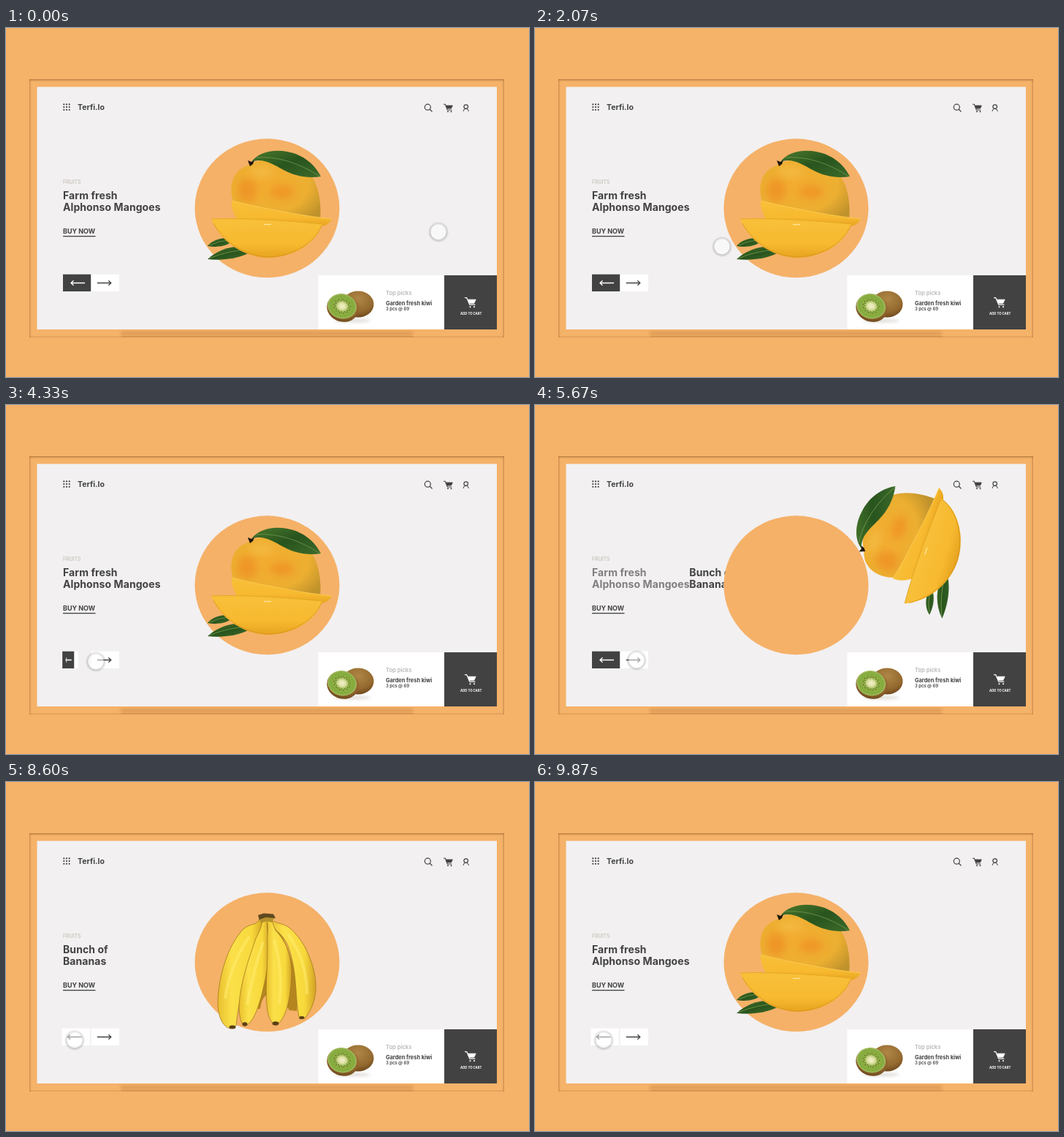
These frames come from a looping animation (716x477 px, 9940 ms). An HTML page:

```html
<!DOCTYPE html>
<html lang="en">
<head>
<meta charset="utf-8">
<title>Fruit shop slider</title>
<style>
  html, body { margin: 0; width: 100%; height: 100%; overflow: hidden; background: #f5b269; }
  svg { position: absolute; left: 0; top: 0; width: 716px; height: 477px; }
  .well { position: absolute; left: 32px; top: 70px; width: 650px; height: 353px;
    box-shadow: inset 0 1px 3px rgba(95, 50, 0, .45), inset 0 0 3px rgba(95, 50, 0, .28); }
  text { font-family: Inter, "Open Sans", sans-serif; font-weight: 700; fill: #424242; }
  .title { font-size: 14px; letter-spacing: .08px; }
  .line { fill: none; stroke: #424242; stroke-width: 1.2; stroke-linecap: round; stroke-linejoin: round; }
</style>
</head>
<body>
<div class="well"></div>
<svg viewBox="0 0 716 477">
  <defs>
    <clipPath id="page"><rect x="42.5" y="80.5" width="629.5" height="331.5"/></clipPath>
    <filter id="soft" x="-20%" y="-200%" width="140%" height="500%"><feGaussianBlur stdDeviation="2"/></filter>
    <filter id="blur" x="-50%" y="-50%" width="200%" height="200%"><feGaussianBlur stdDeviation="6"/></filter>
    <radialGradient id="skin" cx=".4" cy=".4" r=".72">
      <stop offset="0" stop-color="#f3ad31"/><stop offset=".65" stop-color="#ecaf31"/><stop offset="1" stop-color="#c0922b"/>
    </radialGradient>
    <linearGradient id="flesh" x1="0" y1="0" x2="0" y2="1">
      <stop offset="0" stop-color="#f8c03a"/><stop offset=".65" stop-color="#f7b92f"/><stop offset="1" stop-color="#e7a31f"/>
    </linearGradient>
    <linearGradient id="leaf" x1="0" y1="0" x2="1" y2="1">
      <stop offset="0" stop-color="#4b7a2c"/><stop offset=".5" stop-color="#28541e"/><stop offset="1" stop-color="#3d6b2a"/>
    </linearGradient>
    <linearGradient id="peel">
      <stop offset="0" stop-color="#e9bf2e"/><stop offset=".3" stop-color="#fbe04a"/>
      <stop offset=".75" stop-color="#f8d93c"/><stop offset="1" stop-color="#d3a324"/>
    </linearGradient>
    <radialGradient id="fur" cx=".5" cy=".3" r=".7">
      <stop offset="0" stop-color="#b08645"/><stop offset=".7" stop-color="#94692f"/><stop offset="1" stop-color="#70491d"/>
    </radialGradient>
    <radialGradient id="pulp">
      <stop offset="0" stop-color="#f3efcd"/><stop offset=".25" stop-color="#dfe2a4"/><stop offset=".48" stop-color="#8fae43"/>
      <stop offset=".85" stop-color="#84ab3d"/><stop offset="1" stop-color="#a9bd66"/>
    </radialGradient>
    <radialGradient id="halo">
      <stop offset=".68" stop-opacity="0"/><stop offset=".75" stop-opacity=".17"/><stop offset="1" stop-opacity="0"/>
    </radialGradient>
  </defs>

  <rect x="157" y="415" width="400" height="5" fill="#8a4c08" opacity=".24" filter="url(#soft)"/>
  <path d="M158 421.500H558" stroke="#b87634" opacity=".4"/>
  <rect x="42.500" y="80.500" width="629.500" height="331.500" fill="#f2f0f1"/>

  <g id="dots" fill="#424242"></g>
  <text x="98" y="111.500" font-size="10.500">Terfi.lo</text>
  <g class="line">
    <circle cx="577.300" cy="108.200" r="4"/><path d="M580.300 111.300l2.800 2.700"/>
    <circle cx="629.700" cy="107.600" r="2.800"/><path d="M626 113.600q.6-3.400 3.700-3.400t3.700 3.400" stroke-width="1"/>
  </g>
  <g transform="translate(599 104)" fill="#424242" stroke="#424242" stroke-linejoin="round">
    <path d="M0 .2h2.300l3 7.800h6" fill="none" stroke-width="1.100"/><path d="M3.300 2h9l-1.800 4h-5.500z" stroke-width=".8"/>
    <circle cx="6" cy="10.200" r=".6"/><circle cx="10.500" cy="10.200" r=".6"/>
  </g>

  <text x="78" y="213" font-size="6.900" style="fill:#cbc6bb;font-weight:600">FRUITS</text>
  <g id="mangoTitle"><text class="title" x="78" y="233.500">Farm fresh</text><text class="title" x="78" y="249.500">Alphonso Mangoes</text></g>
  <g id="bananaTitle"><text class="title" x="78" y="233.500">Bunch of</text><text class="title" x="78" y="249.500">Bananas</text></g>
  <text x="78" y="281" font-size="9">BUY NOW</text>
  <rect x="78" y="284" width="44.500" height="1.300" fill="#424242"/>
  <g id="buttons"></g>

  <ellipse cx="357.500" cy="246.300" rx="99" ry="95" fill="#f5b168"/>

  <g clip-path="url(#page)">
    <g id="mango">
      <g fill="url(#leaf)">
        <path d="M304 287C290 287 282 291 276 298C287 300 299 299 308 293Z"/>
        <path d="M334 301C316 295 292 301 276 316C295 318 318 316 335 306Z"/>
      </g>
      <path d="M278 315Q305 304 332 303M279 297Q292 291 304 290" fill="none" stroke="#7a9c4c" stroke-width=".8"/>
      <path d="M337 186C350 176 385 177 405 189C424 202 433 228 430 264L330 262C306 246 303 213 316 198C322 190 331 188 337 186Z" fill="url(#skin)"/>
      <g filter="url(#blur)" fill="#ee7d1f" opacity=".5">
        <ellipse cx="330" cy="222" rx="13" ry="16"/><ellipse cx="378" cy="224" rx="17" ry="9"/>
      </g>
      <ellipse cx="350" cy="197" rx="17" ry="6" fill="#f9c95c" opacity=".5" filter="url(#blur)"/>
      <path d="M336 183C345 170 365 165 385 169C408 173 424 188 431 203C412 206 395 202 380 194C365 186 352 177 336 183Z" fill="url(#leaf)"/>
      <path d="M343 177Q385 174 430 203" fill="none" stroke="#7f9f55" stroke-width=".7"/>
      <path d="M331 181l5 2 4-2-2 5-4 3z" fill="#21180d"/>
      <path d="M309 236C340 244 400 256 446 261C443 267 437 271 431 271L318 263C311 254 308 244 309 236Z" fill="url(#flesh)"/>
      <path d="M309 236C340 244 400 256 446 261" fill="none" stroke="#fbcd58" stroke-width=".8"/>
      <path d="M281 261C330 259 390 264 433 268C426 292 397 313 360 314C324 314 292 290 281 261Z" fill="url(#flesh)"/>
      <path d="M281 261C330 259 390 264 433 268" fill="none" stroke="#e3a21f" stroke-width=".8"/>
      <path d="M284 267C298 292 326 312 360 313C393 312 423 293 432 270" fill="none" stroke="#d8941a" stroke-width=".8"/>
      <path d="M353 268.500h10" stroke="#ffe49a" stroke-width="1.300"/>
    </g>
    <g id="banana">
      <path d="M342 205L375 205C397 245 401 285 398 313L388 312C372 285 352 280 348 310L336 310Z" fill="#b5851f"/>
      <g fill="url(#peel)" stroke="#a27a1c" stroke-width=".8">
        <path d="M347 187C344 196 334 193 325 201C303 224 291 266 290 300C290 325 299 336 308 337L315 333C318 300 331 246 347 211L352 190Z"/>
        <path d="M361 187C368 194 379 192 389 200C404 213 415 233 421 256C428 284 423 306 409 323L402 324C395 300 400 260 386 224C380 209 370 204 364 196Z"/>
        <path d="M351 188C350 199 347 204 342 214C331 245 321 275 319 305C319 322 322 331 327 333C340 330 350 300 359 248C363 229 361 214 358 205L357 188Z"/>
        <path d="M357 188C360 200 357 212 358 225C358 262 354 287 358 313C361 328 367 333 372 331C385 320 391 290 391 256C389 226 377 211 369 203L363 187Z"/>
      </g>
      <path d="M300 296Q306 252 333 211M330 304Q338 262 352 218M374 304Q380 258 367 216M412 290Q412 244 386 208" fill="none" stroke="#fff078" stroke-width="4" opacity=".45"/>
      <path d="M345 182L353 179.500L366 180.500L369 186L361 187L356 185L347 189Z" fill="#5e4a1f"/>
      <path d="M347 188L356 185L367 186L364 192L357 190L349 193Z" fill="#b5922c"/>
      <g fill="#5a4017">
        <ellipse cx="310" cy="335" rx="4.500" ry="2.500"/><ellipse cx="327" cy="331" rx="3.500" ry="2.800"/>
        <ellipse cx="369" cy="330" rx="4.500" ry="2.800"/><ellipse cx="405" cy="322" rx="3.500" ry="2"/>
      </g>
    </g>
  </g>

  <rect x="427.500" y="338" width="172.500" height="74" fill="#fff"/>
  <rect x="600" y="338" width="72" height="74" fill="#424242"/>
  <ellipse cx="474" cy="400" rx="25" ry="2" fill="#8d8377" opacity=".35" filter="url(#soft)"/>
  <ellipse cx="482" cy="377.500" rx="21.500" ry="18" fill="url(#fur)"/>
  <g transform="rotate(14 461 381)">
    <ellipse cx="461.500" cy="382.500" rx="22" ry="19" fill="url(#fur)"/>
    <ellipse cx="460" cy="380.500" rx="20" ry="17" fill="url(#pulp)"/>
    <g id="seeds" fill="#3d451c"></g>
  </g>
  <text x="520" y="365" font-size="7.600" style="fill:#b9b9b9;font-weight:600">Top picks</text>
  <text x="520" y="379" font-size="7.400">Garden fresh kiwi</text>
  <text x="520" y="386.300" font-size="5.900" style="font-weight:600">3 pcs @ 69</text>
  <g transform="translate(628 368.500)" fill="#fff" stroke="#fff" stroke-linejoin="round">
    <path d="M0 .2h2.800l4 9.500h7.600" fill="none" stroke-width="1.200"/><path d="M4.200 2.700h11l-2.400 5h-6.400z" stroke-width=".8"/>
    <circle cx="7.500" cy="12.600" r=".7"/><circle cx="13" cy="12.600" r=".7"/>
  </g>
  <text x="622" y="391.500" font-size="4.300" style="fill:#fff">ADD TO CART</text>

  <g id="cursor"><circle cy="1" r="14.500" fill="url(#halo)"/><circle r="10.700" fill="#fff" opacity=".52"/></g>
</svg>
<script>
const LOOP = 9940, BUTTON_W = 38.2;
const $ = id => document.getElementById(id);
const move = (el, x, y, extra = '') => el.setAttribute('transform', `translate(${x} ${y}) ${extra}`);

const ease = x => x < .5 ? 2 * x * x : 1 - 2 * (1 - x) ** 2;
const ramp = (t, start, end) => ease(Math.min(1, Math.max(0, (t - start) / (end - start))));

for (let i = 0; i < 9; i++) {
  $('dots').innerHTML += `<circle cx="${79.3 + i % 3 * 3.7}" cy="${104.4 + (i / 3 | 0) * 3.7}" r="1.1"/>`;
}
for (let i = 0; i < 26; i++) {
  const a = i / 26 * Math.PI * 2, r = .46 + .1 * (i % 2);
  $('seeds').innerHTML += `<circle cx="${460 + 20 * r * Math.cos(a)}" cy="${380.5 + 17 * r * Math.sin(a)}" r=".6"/>`;
}

function buttonFace(fill, ink, offset, dir) {
  const head = dir < 0 ? 'M3.500 -3.200L0 0L3.500 3.200' : 'M15.500 -3.200L19 0L15.500 3.200';
  const g = document.createElementNS('http://www.w3.org/2000/svg', 'g');
  g.innerHTML = `<rect width="${BUTTON_W}" height="23.3" fill="${fill}"/>
    <path d="M0 0H19${head}" transform="translate(${offset} 11.800)" fill="none" stroke="${ink}" stroke-width="1.300"/>`;
  return $('buttons').appendChild(g);
}

function makeButton(x, dir, darkOffset) {
  const light = buttonFace('#fff', '#424242', 8, dir);
  const dark = buttonFace('#424242', '#fff', darkOffset, dir);
  // The two faces trade width as the button darkens.
  return level => {
    move(light, x, 336.7, `scale(${1 - level} 1)`);
    move(dark, x + 1.5 * level, 336.7, `scale(${level} 1)`);
  };
}
const setLeft = makeButton(76.5, -1, 11);
const setRight = makeButton(116.8, 1, 8);

// start, end, x, y
const home = [592, 278];
const stops = [
  [250, 2050, 256, 298], [2500, 4330, 123, 350],
  [4330, 4900, 139, 348], [7000, 8330, 94, 352]
];
function cursorAt(t) {
  let [x, y] = home;
  for (const [start, end, toX, toY] of stops) {
    const k = ramp(t, start, end);
    x += (toX - x) * k;
    y += (toY - y) * k;
  }
  return [x, y];
}

function draw(t) {
  const slide = ramp(t, 5335, 6135) - ramp(t, 8640, 9440);
  const rest = 1 - slide;
  move($('mango'), 423 * slide, -157 * slide, `rotate(${-208 * slide} 363 243)`);
  move($('banana'), 0, 400 * rest, `rotate(${60 * rest} 357 258)`);
  $('mangoTitle').setAttribute('opacity', rest);
  move($('bananaTitle'), 206 * rest, 0);
  setLeft(1 - ramp(t, 4000, 4220) + ramp(t, 4230, 4450) - ramp(t, 8060, 8300));
  setRight(ramp(t, 6150, 6370) - ramp(t, 7200, 7420));
  move($('cursor'), ...cursorAt(t));
}

const began = performance.now();
function tick() {
  draw((performance.now() - began) % LOOP);
  requestAnimationFrame(tick);
}
tick();
</script>
</body>
</html>
```
